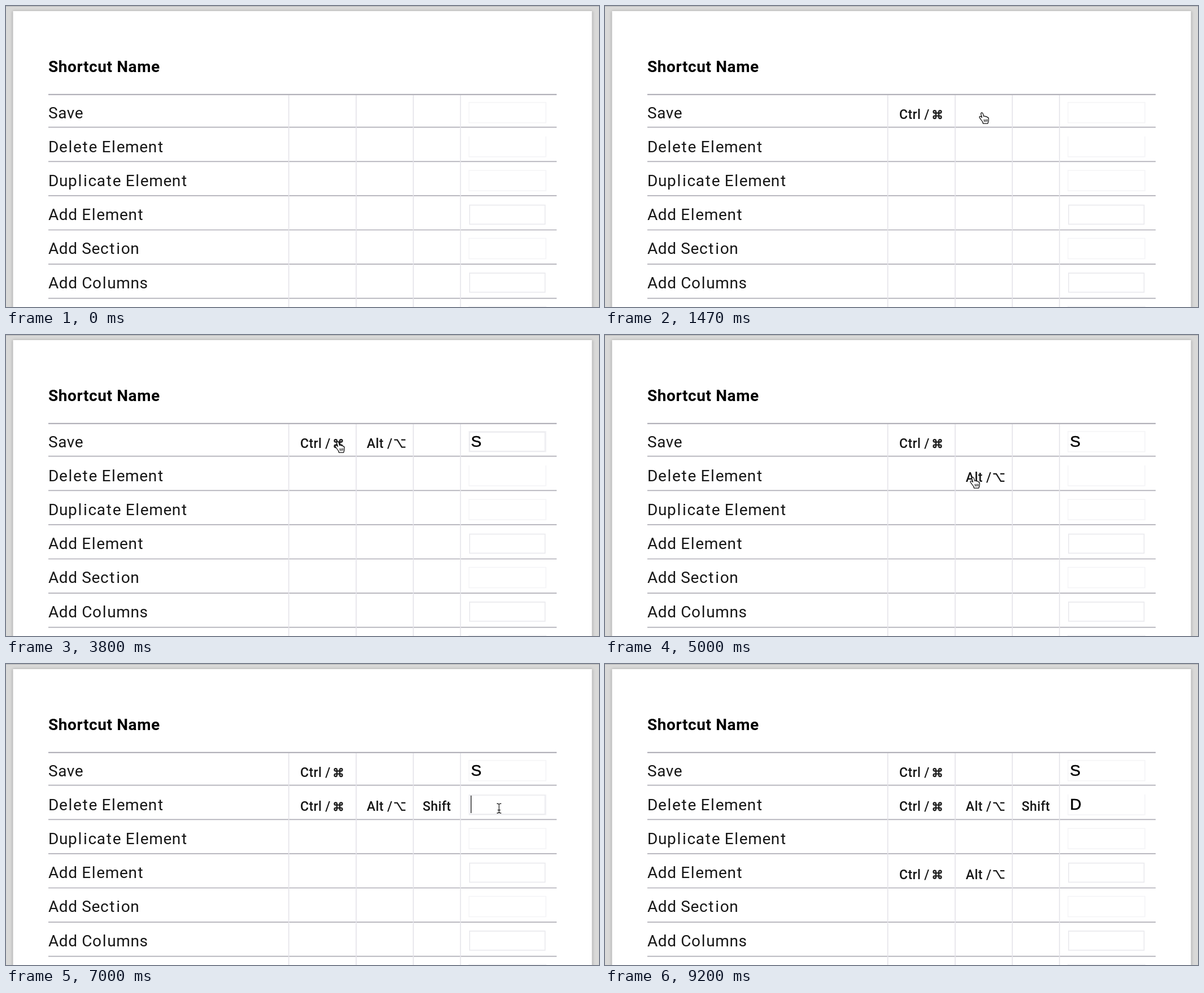
An HTML page that plays this animation: 1050 by 533 pixels, repeating every 10 s.

```html
<!DOCTYPE html>
<html lang="en">
<head>
<meta charset="utf-8">
<title>Shortcut table</title>
<style>
  html, body { margin: 0; width: 100%; height: 100%; overflow: hidden; background: #d9d9d8; }
  svg { display: block; width: 100vw; height: 100vh; }
  text { font-family: Roboto, "Open Sans", sans-serif; white-space: pre; }
  .title { font-size: 28px; font-weight: 700; letter-spacing: .6px; fill: #000; }
  .name { font-size: 28px; fill: #161616; }
  .key text { font-size: 23px; font-weight: 500; letter-spacing: .4px; fill: #161616; }
  .key path { fill: none; stroke: #1c1c1c; stroke-width: 2.3; }
  .typed { font: 28px "Liberation Sans", Arial, sans-serif; fill: #000; stroke: #000; stroke-width: .5; }
  .hover { fill: #b8b5b8; }
  .faint { fill: none; stroke: #f4f4f6; stroke-width: 1.5; }
  .strong { fill: none; stroke: #ebebef; stroke-width: 1.8; }
  .rule { stroke: #b0afb7; stroke-width: 1.7; }
  .divider { stroke: #e4e3e9; stroke-width: 1.6; }
  .caret { stroke: #111; stroke-width: 1.3; }
  .cursor path { stroke: #111; stroke-width: 1.3; stroke-linejoin: round; fill: #fff; }
  .cursor .line { fill: none; stroke-width: 1.2; }
</style>
</head>
<body>
<svg id="stage" viewBox="0 0 1050 533" preserveAspectRatio="none">
  <defs>
    <filter id="soft" x="-5%" y="-5%" width="110%" height="110%"><feGaussianBlur stdDeviation="2.5"/></filter>
  </defs>
  <rect width="1050" height="533" fill="#d9d9d8"/>
  <rect width="1050" height="1" fill="#b5b5b5"/>
  <rect x="11.5" y="9" width="1027" height="560" fill="#a9a9a9" filter="url(#soft)"/>
  <rect x="12.5" y="9" width="1025" height="560" fill="#fff"/>
  <text class="title" x="75" y="117">Shortcut Name</text>
  <path d="M75 156.7H975" stroke="#a8a7b0" stroke-width="2"/>
</svg>
<script>
const LOOP = 10000, FPS = 15, TRAVEL = 270, DWELL = 50, TYPING = 280;
const INPUT = 3;
const names = ['Save', 'Delete Element', 'Duplicate Element', 'Add Element', 'Add Section', 'Add Columns'];
const edges = [500.7, 620, 721.2, 804.7];
const keys = [
  { word: 'Ctrl /', x: 521, iconX: 588.5, icon: 'M-2.6 4.8V-4.8A2.2 2.2 0 1 0-4.8-2.6H4.8A2.2 2.2 0 1 0 2.6-4.8V4.8A2.2 2.2 0 1 0 4.8 2.6H-4.8A2.2 2.2 0 1 0-2.6 4.8Z' },
  { word: 'Alt /', x: 638.8, iconX: 697.3, icon: 'M-10-6.5H-4.5L3.5 6.5H10M2.5-6.5H10' },
  { word: 'Shift', x: 737.7 }
];

// Where the pointer goes: row, x, arrival, click, typed letter
const visits = [
  [-4, 590, 0],
  [0, 562, 930, 1190],
  [0, 671, 1465, 1590],
  [0, 839, 2200, 2790, 'S'],
  [0, 591, 3795],
  [0, 671, 4200, 4230],
  [1, 655, 4735, 4860],
  [1, 560, 5530, 6055],
  [1, 763, 6330, 6450],
  [1, 873, 6730, 6990, 'D'],
  [3, 560, 8330, 8585],
  [3, 672, 8800, 8990],
  [5, 600, 9190]
].map(([row, x, arrive, click, letter]) => {
  const col = edges.filter(e => e < x).length - 1;
  const y = 198.6 + 63 * row - (col === INPUT ? 6 : 0);
  return { row, col, x, y, arrive, click, letter };
});

const rowY = i => 198.6 + 60.2 * i;
const boxY = i => 170.8 + 60.2 * i;
const stage = document.getElementById('stage');

function add(tag, attrs, parent = stage, text) {
  const el = document.createElementNS('http://www.w3.org/2000/svg', tag);
  for (const k in attrs) el.setAttribute(k, attrs[k]);
  if (text) el.textContent = text;
  parent.appendChild(el);
  return el;
}

// A little extra room beside thin letters.
function spacing(str) {
  const side = c => ('lit'.includes(c) ? 1.1 : 0);
  return [...str].map((c, i) => i ? .6 + side(c) + side(str[i - 1]) : 0).join(' ');
}

function field(i, strong) {
  const y = boxY(i);
  if (strong) return add('rect', { class: 'strong', x: 820.9, y: y + 1.2, width: 133.6, height: 33.8 });
  const side = `M819.7 ${y}V${y + 36}H956V${y}`;
  return add('path', { class: 'faint', d: i === 1 ? side : side + 'Z' });
}

function keyLabel(row, col) {
  const k = keys[col], y = rowY(row) + 1.5, g = add('g', { class: 'key' });
  add('text', { x: k.x, y }, g, k.word);
  if (k.icon) add('path', { d: k.icon, transform: `translate(${k.iconX} ${y - 8})` }, g);
  return g;
}

names.forEach((n, i) => {
  add('text', { class: 'name', x: 75, y: rowY(i), dx: spacing(n) }, stage, n);
  add('path', { class: 'rule', d: `M75 ${214.7 + 60.6 * i}h900` });
});
for (const x of edges) add('path', { class: 'divider', d: `M${x} 158V533` });
for (let i = 0; i <= names.length; i++) field(i, i === 3 || i === 5);

// Every part is visible from one time until another.
const parts = [];
const show = (el, from, to = LOOP) => parts.push({ el, from, to });

const pressed = {}, hidden = [];
visits.forEach((v, i) => {
  const { row, col, click, letter } = v;
  if (!click) return;
  if (col === INPUT) {
    const next = visits[i + 1].arrive, typed = click + TYPING;
    show(field(row, true), click, next + DWELL);
    show(add('path', { class: 'caret', d: `M823.5 ${boxY(row) + 2}v31` }), click, typed);
    show(add('text', { class: 'typed', x: 823.2, y: boxY(row) + 27 }, stage, letter), typed);
    hidden.push([typed, next - TRAVEL]);
    return;
  }
  const id = row + ':' + col;
  if (pressed[id]) {
    pressed[id].to = click;
    return;
  }
  const left = edges[col] + 13.5, width = edges[col + 1] - edges[col] - 28;
  show(add('rect', { class: 'hover', x: left, y: boxY(row) - .2, width, height: 36 }), v.arrive + DWELL, click);
  show(keyLabel(row, col), click);
  pressed[id] = parts[parts.length - 1];
});
hidden.push([0, visits[1].arrive - TRAVEL], [visits[visits.length - 1].arrive, LOOP]);

const cursor = add('g', { class: 'cursor' });
const shape = (body, lines) => {
  const g = add('g', {}, cursor);
  if (body) add('path', { d: body }, g);
  if (lines) add('path', { d: lines, class: 'line' }, g);
  return g;
};
const hand = shape(
  'M-1.5 9.5Q-2 6-5 3L-7.5-.5Q-8.6-2.4-7.2-3.2Q-5.8-3.8-3.6-1.4L-5.3-7Q-5.6-9.6-3.8-9.7Q-2.2-9.7-1.6-7.4L-.4-3.2Q1.6-4.4 2.8-2.6Q4.8-3.4 5.8-1.6Q8-1.6 8.2 1Q8.6 5 6.8 9.5Z',
  'M.2 2.2L.9 6.5M2.9 2.2L3.3 6.5M5.5 2L5.6 6.2');
const beam = shape('', 'M-4-8.5Q0-8.5 0-6.5Q0-8.5 4-8.5M0-6.5V6.5M-4 8.5Q0 8.5 0 6.5Q0 8.5 4 8.5M-2.5 3H2.5');
const arrow = shape('M-5-9V6L-1.6 3L.8 8.6L3.2 7.6L.9 2.2H5.4Z');

function place(t) {
  const i = Math.max(1, visits.findIndex(v => v.arrive > t));
  const a = visits[i - 1], b = visits[i];
  const p = Math.min(1, Math.max(0, 1 - (b.arrive - t) / TRAVEL));
  const ease = p * p * (3 - 2 * p);
  return [a.x + (b.x - a.x) * ease, a.y + (b.y - a.y) * ease];
}

const toggle = (el, on) => el.setAttribute('visibility', on ? 'inherit' : 'hidden');

function draw(ms) {
  const t = Math.floor(ms * FPS / 1000 + .06) * 1000 / FPS;
  for (const p of parts) toggle(p.el, t >= p.from && t < p.to);
  toggle(cursor, !hidden.some(([from, to]) => t >= from && t < to));
  const [x, y] = place(t);
  cursor.setAttribute('transform', `translate(${x} ${y})`);
  const kind = y < 157 ? arrow : x > edges[INPUT] ? beam : hand;
  for (const c of [hand, beam, arrow]) toggle(c, c === kind);
}

const start = performance.now();
function tick() {
  draw((performance.now() - start) % LOOP);
  requestAnimationFrame(tick);
}
tick();
</script>
</body>
</html>
```
